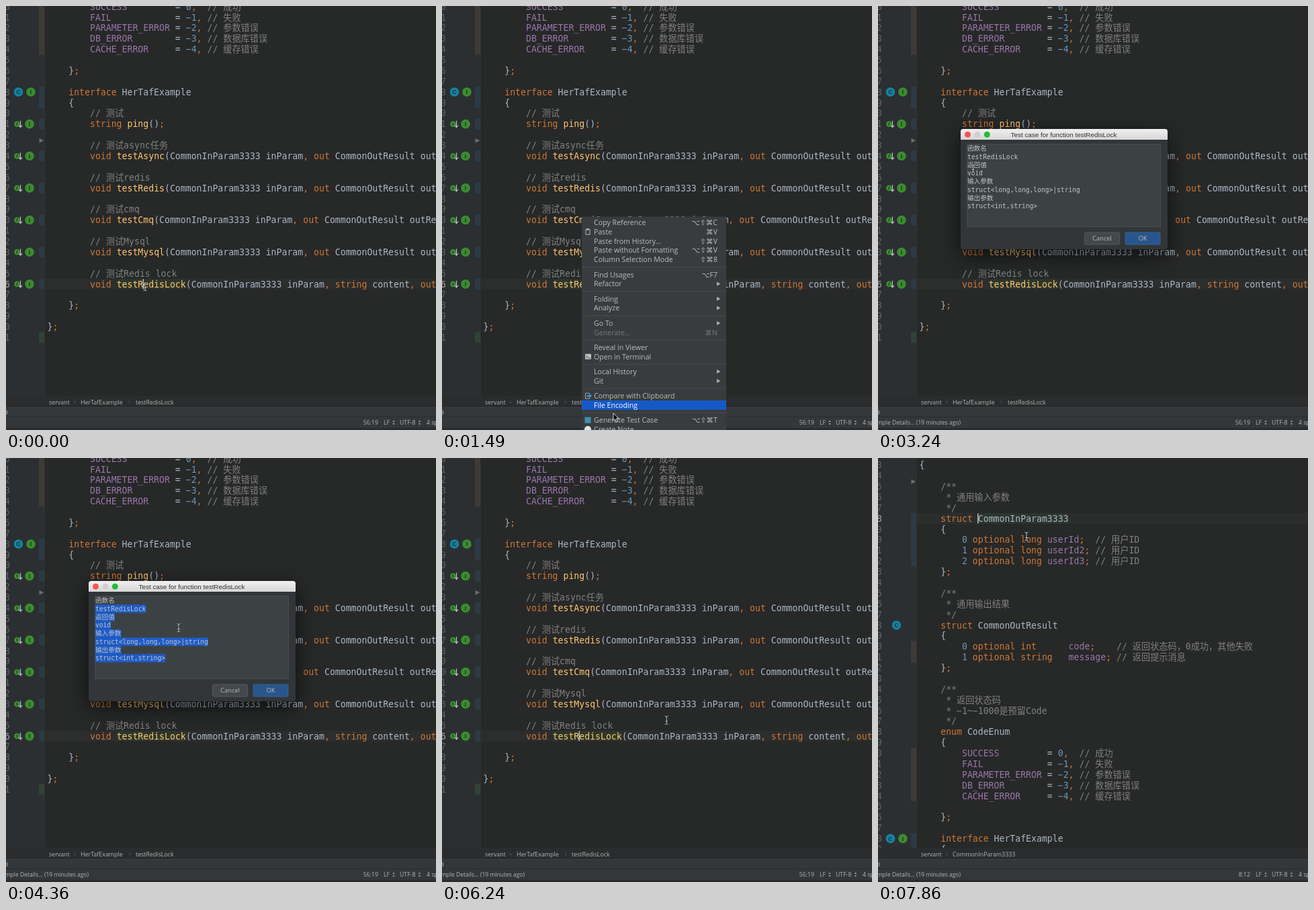
An HTML page for the animation above (7990 ms loop, 640x631 px).

```html
<!DOCTYPE html>
<html lang="en">
<head>
<meta charset="utf-8">
<style>
html, body { margin: 0; width: 100%; height: 100%; overflow: hidden; background: #272828; }
svg { display: block; }
text { white-space: pre; font-family: "Open Sans", "Noto Sans", "DejaVu Sans", sans-serif; fill: #bbb; }
.mono text { font: 13.18px "DejaVu Sans Mono", "Noto Sans CJK SC", monospace; fill: #a9b7c6; }
#doc .num { fill: #606366; text-anchor: end; }
#doc .num.cur { fill: #a4a3a3; }
.cm { fill: #808080; } .kw { fill: #cc7832; } .en { fill: #9876aa; }
.fn { fill: #ffc66d; } .nu { fill: #6897bb; }
.link .l56 .ty { fill: #3f94e8; text-decoration: underline; }
#doc .ico { font: 700 9px "Liberation Sans", sans-serif; fill: #1b3328; text-anchor: middle; }
.menu text { font-size: 10.65px; }
.menu .key { text-anchor: end; }
.menu .on text { fill: #fff; }
.menu .off text { fill: #777; }
.bar text { font-size: 8.7px; fill: #b4b4b4; }
.bar .crumb { font-size: 8.9px; }
.dialog { filter: drop-shadow(0 9px 15px rgba(0,0,0,.65)); }
.dialog .mono text { font-size: 9.62px; fill: #c0c4c6; }
.mid { text-anchor: middle; }
</style>
</head>
<body>
<script>
const LOOP = 7990, CW = 7.935, LH = 15.88, X0 = 61.5;
const colX = c => X0 + c * CW;
const lineY = n => 128 + (n - 38) * LH;
const rect = (x, y, w, h, fill, more = '') =>
  `<rect x="${x}" y="${y}" width="${w}" height="${h}" fill="${fill}" ${more}/>`;
const circle = (x, y, r, fill, more = '') => `<circle cx="${x}" cy="${y}" r="${r}" fill="${fill}" ${more}/>`;
const text = (x, y, s, cls = '', more = '') => `<text x="${x}" y="${y}" class="${cls}" ${more}>${s}</text>`;
const path = (d, fill, stroke = 'none', more = '') => `<path d="${d}" fill="${fill}" stroke="${stroke}" ${more}/>`;

// ---------- editor ----------
const method = (note, name) => `        // 测试${note}
        void ${name}(CommonInParam3333 inParam, out CommonOutResult outResult);
`;
const source = `{

    /**
     * 通用输入参数
     */
    struct CommonInParam3333
    {
        0 optional long userId;  // 用户ID
        1 optional long userId2; // 用户ID
        2 optional long userId3; // 用户ID
    };

    /**
     * 通用输出结果
     */
    struct CommonOutResult
    {
        0 optional int      code;    // 返回状态码，0成功，其他失败
        1 optional string   message; // 返回提示消息
    };

    /**
     * 返回状态码
     * −1~−1000是预留Code
     */
    enum CodeEnum
    {
        SUCCESS         = 0,  // 成功
        FAIL            = −1, // 失败
        PARAMETER_ERROR = −2, // 参数错误
        DB_ERROR        = −3, // 数据库错误
        CACHE_ERROR     = −4, // 缓存错误

    };

    interface HerTafExample
    {
        // 测试
        string ping();

${method('async任务', 'testAsync')}
${method('redis', 'testRedis')}
${method('cmq', 'testCmq')}
${method('Mysql', 'testMysql')}
        // 测试Redis lock
        void testRedisLock(CommonInParam3333 inParam, string content, out

    };

};
`.split('\n');

const tokens = [
  ['cm', '//.*|/\\*\\*|^ +\\*.*'],
  ['kw', '\\b(?:interface|struct|enum|optional|long|int|string|void|out)\\b|[;,]'],
  ['en', '\\b[A-Z_]{4,}\\b|\\b(?:userId\\d?|code|message)(?=;)'],
  ['fn', '\\w+(?=\\()'],
  ['nu', '−?\\b\\d\\b'],
  ['ty', 'Common\\w+']
];
const lexer = new RegExp(tokens.map(t => `(${t[1]})`).join('|'), 'g');
const paint = s => s.replace(lexer, (m, ...g) =>
  `<tspan class="${tokens[g.slice(0, tokens.length).findIndex(v => v !== undefined)][0]}">${m}</tspan>`);

const strip = (from, to, fill) => rect(49, lineY(from) - 8, 8, (to - from + 1) * LH, fill, 'opacity=".6"');
const badge = (x, n, letter) => circle(x, lineY(n), 6.8, letter == 'C' ? '#1583a4' : '#3b8c2f') +
  text(x, lineY(n) + 3.3, letter, 'ico');
const override = n => circle(16.5, lineY(n), 4.4, '#3b8c2f') + rect(15.8, lineY(n) - 2, 1.2, 4, '#1b3328') +
  path(`M21.5 ${lineY(n) - 5}v10m-2.5 -3l2.5 3l2.5 -3`, 'none', '#c4c8c8', 'stroke-width="1.1"') + badge(35, n, 'I');
const wedge = n => path(`M49.5 ${lineY(n) - 3.5}l7 3.5l-7 3.5z`, '#686c6e');
const glow = (n, col, len) => rect(colX(col), lineY(n) - 7.5, len * CW, 15, '#2c372d');
const methods = [41, 44, 47, 50, 53, 56];

const editor = `<g id="doc" class="mono">
  <rect id="row" x="57" width="583" height="16" fill="#2c2d2d"/>
  <g id="useFn">${glow(56, 13, 13)}</g>
  <g id="useType">${[[8, 11], [44, 23], [47, 23], [50, 21], [53, 23]].map(p => glow(...p, 17)).join('')}</g>
  ${strip(8, 12, '#2c4152') + strip(20, 21, '#4b4238') + strip(30, 34, '#4b4238') + strip(38, 39, '#2c4152')}
  ${methods.map(n => strip(n, n, '#2c4152') + override(n)).join('')}
  ${strip(61, 61, '#35503a') + wedge(4.55) + wedge(42.55)}
  ${badge(27.5, 18, 'C') + badge(18.5, 38, 'C') + badge(37, 38, 'I')}
  ${source.map((s, i) => text(6, lineY(i + 3) + 4.7, i + 3, 'num') +
    text(X0, lineY(i + 3) + 4.7, paint(s), 'l' + (i + 3))).join('')}
  <rect id="caret" width="1.4" height="15" fill="#c8c8c8"/>
</g>`;

// ---------- bottom bars ----------
const updown = x => path(`M${x - 1.7} 619l1.7 -2.4l1.7 2.4zM${x - 1.7} 621l1.7 2.4l1.7 -2.4z`, '#a0a0a0');
const chevron = x => path(`M${x} 587.8l2 2l-2 2`, 'none', '#66696b', 'stroke-width=".8"');
const bars = `<g class="bar">
  ${rect(0, 580, 640, 18, '#2a2c2d') + rect(0, 597, 640, 34, '#34373a')}
  ${rect(0, 597, 640, 1, '#3d4042') + rect(0, 611, 640, 1, '#2a2c2e') + rect(0, 628, 640, 3, '#292b2d')}
  ${text(64, 593, 'servant', 'crumb') + chevron(101)}
  <text id="crumb1" x="111" y="593" class="crumb"></text>
  <g id="crumb2">${chevron(183) + text(193, 593, 'testRedisLock', 'crumb')}</g>
  ${path('M-2 602h1.5a2.5 2.8 0 0 1 0 5.6h-1.5', 'none', '#aaa')}
  <text id="commit" x="123" y="623.3" text-anchor="end" style="font-size:8.5px">Example Details... (19 minutes ago)</text>
  <text id="pos" x="554" y="623.3" text-anchor="end"></text>
  ${text(562, 623.3, 'LF') + updown(577) + text(586, 623.3, 'UTF-8') + updown(615.5) + text(626, 623.3, '4 spaces')}
</g>`;

// ---------- context menu ----------
const entries = ['Copy Reference|⌥⇧⌘C', 'Paste|⌘V', 'Paste from History...|⇧⌘V', 'Paste without Formatting|⌥⇧⌘V',
  'Column Selection Mode|⇧⌘8', '', 'Find Usages|⌥F7', 'Refactor|>', '', 'Folding|>', 'Analyze|>', '', 'Go To|>',
  'Generate...|⌘N', '', 'Reveal in Viewer', 'Open in Terminal', '', 'Local History|>', 'Git|>', '',
  'Compare with Clipboard', 'File Encoding', '', 'Generate Test Case|⌥⇧⌘T', 'Create Note'];
const icons = {
  'Paste': y => path(`M214 ${y - 3.5}h6v7.5h-6z`, 'none', '#b8bbbc') + rect(215.5, y - 5, 3, 2.5, '#b8bbbc'),
  'Open in Terminal': y => rect(213, y - 4, 9, 8, '#c0c3c4', 'rx="1"') +
    path(`M214.5 ${y - 2}l2 2l-2 2m3 0h3`, 'none', '#333'),
  'Compare with Clipboard': y => path(`M213.5 ${y - 4}h6v8h-6z`, 'none', '#9aa4aa') +
    path(`M215 ${y - 1}h4v-2.5l4 3.5l-4 3.5v-2.5h-4z`, '#3a9ad4'),
  'Generate Test Case': y => rect(212.5, y - 4.5, 9, 9, '#3d91ac'),
  'Create Note': y => circle(217, y, 5, '#e4e4e4')
};
const rows = [];
let rowY = 322.2, menu = rect(208, 313.5, 215, 330, '#393c3e');
for (const entry of entries) {
  if (!entry) {
    menu += rect(209, rowY - 3, 213, 1, '#484b4d');
    rowY += 8.5;
    continue;
  }
  const [name, key = ''] = entry.split('|'), y = rowY, off = name == 'Generate...';
  menu += `<g class="${off ? 'off' : 'item'}">${rect(208, y - 7, 215, 14, '#1559c9', 'class="hl" visibility="hidden"')}
    ${icons[name] ? icons[name](y) : ''}${text(226, y + 3.8, name)}
    ${key == '>' ? path(`M409 ${y - 3}l5.5 3l-5.5 3z`, '#aaadae') : text(410, y + 3.8, key, 'key')}</g>`;
  if (!off) rows.push(y);
  rowY += 13.8;
}

// ---------- dialog ----------
const report = ['函数名', 'testRedisLock', '返回值', 'void', '输入参数', 'struct&lt;long,long,long>|string',
  '输出参数', 'struct&lt;int,string>'];
const reportY = i => 212 + i * 12.27;
const span = s => /^\w/.test(s) ? s.replace('&lt;', '<').length * 5.79 : s.length * 9.62;
const button = (x, w, fill, edge, label) => rect(x, 337, w, 18, fill, `rx="2" stroke="${edge}" stroke-width=".8"`) +
  text(x + w / 2, 349.4, label, 'mid', 'style="font-size:9.4px"');
const dialog = `<g id="dialog" class="dialog">
  ${rect(123, 183, 308, 179, '#323638', 'rx="4"')}
  ${path('M123 199v-12q0 -4 4 -4h300q4 0 4 4v12z', 'url(#title)')}
  ${circle(133.5, 191.3, 4.5, '#f9544d') + circle(148, 191.3, 4.5, '#cfcfcf') + circle(162.3, 191.3, 4.5, '#22bd35')}
  ${text(276.5, 194.9, 'Test case for function testRedisLock', 'mid',
    'style="font:9.87px Liberation Sans,sans-serif;fill:#333"')}
  ${rect(132.5, 205.5, 288, 123, '#3c4243', 'stroke="#4b5052" stroke-width=".8"')}
  <g class="mono">${report.map((s, i) =>
    (i ? rect(133, reportY(i) - 6.1, span(s), 12.3, '#1e5cc8', 'class="sel"') : '') +
    text(133, reportY(i) + 3.4, s)).join('')}</g>
  ${button(307.5, 52, '#43484a', '#5a5f61', 'Cancel') + button(368, 52, '#28568c', '#3b6a9f', 'OK')}
</g>`;

const tip = `<g id="tip">
  ${path('M175 376.5h250q2 0 2 2v18q0 2 -2 2h-121l-4 6l-4 -6h-121q-2 0 -2 -2v-18q0 -2 2 -2z', '#3b3f41', '#676b6d')}
  ${text(299, 391, 'Struct "CommonInParam3333" [her_taf_example.jce]', 'mid', 'style="font-size:8.95px"')}
</g>`;

// ---------- pointer ----------
const beam = 'M-2.6 -6.5q2.6 0 2.6 1.8q0 -1.8 2.6 -1.8M0 -5v9M-2.6 6q2.6 0 2.6 -1.8q0 1.8 2.6 1.8M-1.6 1.5h3.2';
const pointer = `<circle id="ring" fill="none" stroke="#c8c8c8" stroke-width=".9" opacity=".6"/>
<g id="mouse">
  <g id="beam">${path(beam, 'none', '#151515', 'stroke-width="1.8"') + path(beam, 'none', '#dcdcdc', 'stroke-width=".9"')}</g>
  <g id="arrow">${path('M0 0v11l2.6 -2.3l1.8 4l2 -.9l-1.8 -3.9h3.4z', '#080808', '#eee', 'stroke-width=".9"')}</g>
  <g id="hand">${path('M-1 -4q1.2 -1.5 2.2 0v4l4 1q1.4 .5 1 2l-1 4h-5.5l-3.4 -4.6q-.3 -1.8 1.4 -1.2l1.3 1.2z',
    '#f4f4f4', '#111', 'stroke-width=".8"')}</g>
</g>`;

document.body.innerHTML = `<svg width="640" height="631" viewBox="0 0 640 631">
  <linearGradient id="title" x2="0" y2="1"><stop stop-color="#f0f0f0"/><stop offset="1" stop-color="#d6d6d6"/></linearGradient>
  ${rect(0, 0, 640, 631, '#272828') + rect(0, 0, 57, 631, '#2b2f31') + rect(56.5, 0, 1, 631, '#323638')}
  ${editor + bars}<g id="menu" class="menu">${menu}</g>${dialog + tip + pointer}</svg>`;

// ---------- timeline ----------
const $ = id => document.getElementById(id);
const show = (el, on) => el.setAttribute('visibility', on ? 'inherit' : 'hidden');
const set = (el, attrs) => { for (const k in attrs) el.setAttribute(k, attrs[k]); };
const all = sel => [...document.querySelectorAll(sel)];
const items = all('.item'), picks = all('.sel'), nums = all('.num');

// time, x, y, pointer shape from here on
const track = [[0, 207, 418, 'beam'], [250, 207, 418, 'arrow'], [875, 248, 590, 'arrow'], [1250, 252, 600, 'arrow'],
  [1750, 258, 612, 'arrow'], [2625, 258, 612, 'arrow'], [3125, 150, 260, 'beam'], [3375, 133, 224, 'beam'],
  [4000, 245, 299, 'beam'], [4375, 257, 253, 'beam'], [4750, 257, 253, 'beam'], [5125, 350, 320, 'arrow'],
  [5500, 391, 343, 'arrow'], [5900, 391, 343, 'beam'], [6500, 300, 419, 'beam'], [6875, 300, 419, 'hand'],
  [7250, 300, 419, 'beam'], [7750, 221, 117, 'beam'], [LOOP + 10, 221, 117, 'beam']];
const clicks = [2190, 5800, 7065];

function draw(t) {
  const i = track.findLastIndex(k => k[0] <= t), a = track[i], b = track[i + 1] || a;
  const p = b === a ? 0 : (t - a[0]) / (b[0] - a[0]), e = p * p * (3 - 2 * p);
  const x = a[1] + (b[1] - a[1]) * e, y = a[2] + (b[2] - a[2]) * e;
  set($('mouse'), { transform: `translate(${x} ${y})` });
  for (const s of ['beam', 'arrow', 'hand']) show($(s), s == a[3]);

  const click = clicks.find(c => t >= c && t < c + 200);
  show($('ring'), click);
  if (click) set($('ring'), { cx: x, cy: y + 2, r: 9 + (t - click) / 10 });

  const menuOn = t >= 250 && t < 2500, boxOn = t >= 2750 && t < 5950;
  const moved = t >= 6600, link = t >= 6875 && t < 7250, jumped = t >= 7250;
  show($('menu'), menuOn);
  const near = rows.reduce((m, r, j) => Math.abs(r - y + 4) < Math.abs(rows[m] - y + 4) ? j : m, 0);
  items.forEach((el, j) => {
    const on = menuOn && t > 300 && j == near;
    el.classList.toggle('on', on);
    show(el.querySelector('.hl'), on);
  });

  show($('dialog'), boxOn);
  picks.forEach((el, j) => show(el, boxOn && t < 4750 && t > 3375 + j * 80));

  const line = jumped ? 8 : 56, col = jumped ? 12 : moved ? 31 : 19;
  set($('doc'), { transform: `translate(0 ${jumped ? 438.4 : 0})`, class: link ? 'mono link' : 'mono' });
  set($('row'), { y: lineY(line) - 8 });
  set($('caret'), { x: colX(col - 1) - .7, y: lineY(line) - 7.5 });
  nums.forEach((el, j) => el.classList.toggle('cur', j + 3 == line));
  show($('caret'), !boxOn && !menuOn);
  show($('useFn'), !moved);
  show($('useType'), moved);
  show($('tip'), link);
  show($('commit'), t >= 2500);
  show($('crumb2'), !jumped);
  $('crumb1').textContent = jumped ? 'CommonInParam3333' : 'HerTafExample';
  $('pos').textContent = `${line}:${col}`;
}

function tick() {
  draw(Math.floor((performance.now() % LOOP + 16) / 125) * 125);
  requestAnimationFrame(tick);
}
tick();
</script>
</body>
</html>
```
